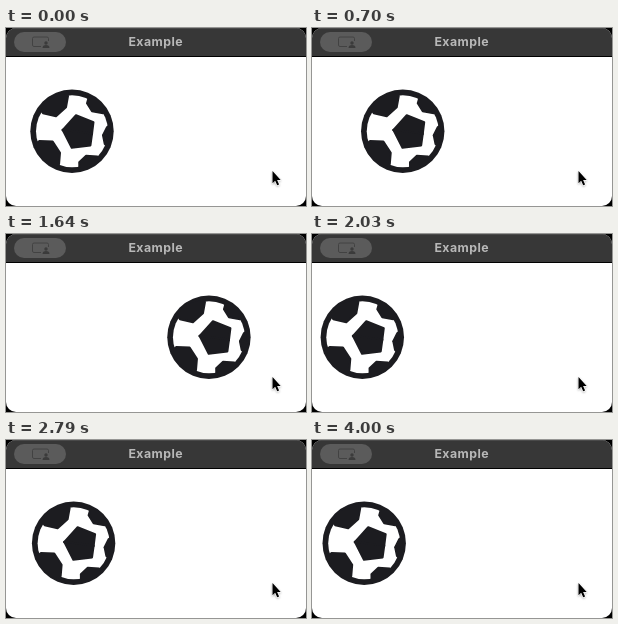
An HTML page that plays this animation: 300 by 178 pixels, repeating every 4.06 s.

```html
<!DOCTYPE html>
<html lang="en">
<head>
<meta charset="utf-8">
<title>Example</title>
<style>
  html, body { margin: 0; width: 100%; height: 100%; overflow: hidden; background: #000; }
  svg { display: block; width: 300px; height: 178px; }
  .title { font: 700 12.3px Inter, "Liberation Sans", sans-serif; letter-spacing: .45px; fill: #b8b8b8; text-anchor: middle; }
  .icon { fill: none; stroke: #424242; }
  .patches { fill: #1c1c20; stroke: #1c1c20; stroke-width: 2; stroke-linejoin: round; }
</style>
</head>
<body>
<svg viewBox="0 0 300 178">
  <defs>
    <clipPath id="window"><rect width="300" height="178" rx="10"/></clipPath>
    <clipPath id="disc"><circle r="41"/></clipPath>
    <filter id="soft"><feGaussianBlur stdDeviation=".45"/></filter>
    <filter id="shade" x="-50%" y="-50%" width="200%" height="200%">
      <feDropShadow dx="0" dy="1" stdDeviation="1" flood-opacity=".35"/>
    </filter>
    <!-- One half of the pattern; the other is its mirror image. -->
    <g id="half">
      <path d="M-9.500-1 4-16 21.500-9 20 3z"/>
      <path d="M-32-22-29-18-16-15-6-24-4-35-5-39-26-33z"/>
      <path d="M17-35 15-28 20-20 31-18 35-20 30-32z"/>
      <path d="M39-6 35-4 31 4 39 5z"/>
    </g>
  </defs>
  <g clip-path="url(#window)">
    <rect width="300" height="178" fill="#fff"/>
    <rect width="300" height="28" fill="#373737"/>
    <rect width="300" height="1" fill="#4a4a4a"/>
    <rect y="28" width="300" height="1" fill="#000"/>

    <rect x="8" y="4" width="52" height="20" rx="10" fill="#5b5b5b"/>
    <path class="icon" d="M35 18.5H28q-1.5 0-1.5-1.5V10.5q0-1.5 1.5-1.5H41q1.5 0 1.5 1.5V13"/>
    <circle cx="40" cy="15" r="1.7" fill="#3b3b3b"/>
    <path d="M36.5 20q0-3 3.500-3t3.500 3z" fill="#3b3b3b"/>
    <text class="title" x="149.700" y="17.800">Example</text>

    <g id="ball" transform="translate(66 103.2)">
      <g filter="url(#soft)">
        <circle r="41.700" fill="#1c1c20"/>
        <circle r="36" fill="#fff"/>
        <g class="patches" clip-path="url(#disc)">
          <use href="#half"/>
          <use href="#half" transform="rotate(15) scale(1 -1)"/>
        </g>
      </g>
    </g>

    <path d="M266.500 143v12.200l2.700-2.500 2 4.600 1.900-.8-2-4.500h3.600z" fill="#000"
          stroke="#fff" stroke-width=".8" paint-order="stroke" filter="url(#shade)"/>
  </g>
</svg>
<script>
  const LOOP = 4060, STEP = 30.28, FIRST = 60;
  const REST = 66, DECAY = 2.37, FREQ = 18.1;
  // Each move adds a spring towards a new resting place: [start ms, shift px].
  const moves = [[60, 27], [897, 127], [1762, -167]];
  const ball = document.getElementById("ball");

  function spring(ms) {
    if (ms <= 0) return 0;
    const s = ms / 1000, a = FREQ * s;
    return 1 - Math.exp(-DECAY * s) * (Math.cos(a) + DECAY / FREQ * Math.sin(a));
  }

  // The picture advances in discrete steps of about 30 ms.
  function stepTime(t) {
    return t < FIRST ? 0 : FIRST + STEP * Math.floor((t - FIRST + 10) / STEP);
  }

  function draw() {
    const t = stepTime(performance.now() % LOOP);
    const x = moves.reduce((sum, [start, shift]) => sum + shift * spring(t - start), REST);
    ball.setAttribute("transform", `translate(${x.toFixed(2)} 103.2)`);
    requestAnimationFrame(draw);
  }
  draw();
</script>
</body>
</html>
```
